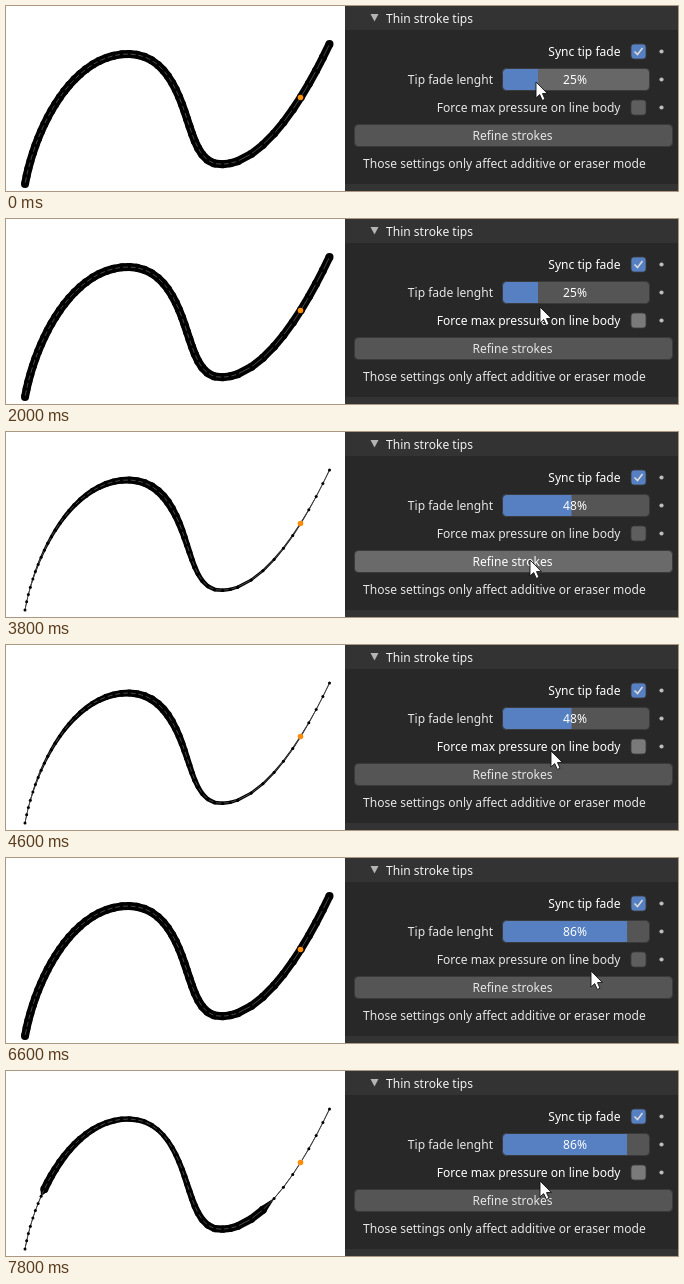
Animation of 672x185 px, one loop 8000 ms. Source, as an HTML page with a canvas:

```html
<!DOCTYPE html>
<html lang="en">
<head>
<meta charset="utf-8">
<title>Thin stroke tips</title>
<style>
  html, body { margin: 0; width: 100%; height: 100%; overflow: hidden; background: #fff; }
  canvas { display: block; }
</style>
</head>
<body>
<canvas id="stage" width="672" height="185"></canvas>
<script>
const ctx = document.getElementById('stage').getContext('2d');
const LOOP = 8000, STEP = 200, FULL = 4;
const BLUE = '#5680c2', TEXT = '#e6e6e6', WHITE = '#fff', EDGE = '#3a3a3a';

// Bezier chain: start, then two handles and an end for each piece
const CURVE = [
  [19, 178], [30, 118], [68, 48], [122, 48], [152, 48], [168, 72], [180, 110],
  [187, 130], [192, 152], [208, 157.5], [246, 165], [287, 115], [323.5, 38]
];

// Cursor tip and slider value: time, x, y, percent
const KEYS = [
  [0, 530, 76, 25], [400, 523, 122, 25], [1800, 523, 122, 25], [2000, 534, 88, 25],
  [2400, 537, 74, 25], [2800, 561, 74, 48], [3200, 541, 107, 48], [3800, 524, 128, 48],
  [4600, 545, 106, 48], [5600, 565, 74, 48], [6200, 605, 74, 86], [6600, 585, 113, 86],
  [7200, 528, 128, 86], [7800, 534, 110, 86]
];
// From pressing the button until undo
const REFINED = [[800, 2000], [3600, 4800], [7400, LOOP]];

function stateAt(t) {
  const next = KEYS.findIndex(k => k[0] > t);
  const a = KEYS[next < 0 ? KEYS.length - 1 : next - 1], b = next < 0 ? a : KEYS[next];
  const f = next < 0 ? 0 : (t - a[0]) / (b[0] - a[0]);
  const [, x, y, value] = a.map((v, i) => v + (b[i] - v) * f);
  return { x, y, value, drag: a[3] !== b[3] };
}

function bezier(i, f) {
  const g = 1 - f, weights = [g * g * g, 3 * g * g * f, 3 * g * f * f, f * f * f];
  return [0, 1].map(axis => weights.reduce((sum, w, k) => sum + w * CURVE[i + k][axis], 0));
}

// Stroke points lie close together at first and wide apart towards the end
function buildPoints() {
  const dense = [];
  let len = 0;
  for (let i = 0; i + 3 < CURVE.length; i += 3) {
    for (let k = 0; k <= 200; k++) {
      const p = bezier(i, k / 200), q = dense.length ? dense[dense.length - 1].p : p;
      len += Math.hypot(p[0] - q[0], p[1] - q[1]);
      dense.push({ p, len });
    }
  }
  const points = [];
  const spread = (from, to, gap) => {
    const n = Math.round((to - from) / gap);
    for (let i = 0; i < n; i++) {
      points.push(dense.find(s => s.len >= from + (to - from) * i / n).p);
    }
  };
  const turn = len - 152;
  spread(0, turn, 7.8);
  spread(turn, len, 15.2);
  points.push(CURVE[CURVE.length - 1]);
  return points;
}
const points = buildPoints();

function radius(i, fade) {
  if (!fade) return FULL;
  const last = points.length - 1, d = Math.min(i, last - i) / last;
  // Past half, the two fades overlap and the body thins towards the middle
  if (fade > 0.5) return d < 1 - fade ? 0.3 : FULL * (1 - d) / fade;
  return Math.max(0.3, FULL * Math.min(1, d / fade));
}

function disc(x, y, r, color) {
  ctx.fillStyle = color;
  ctx.beginPath();
  ctx.arc(x, y, r, 0, Math.PI * 2);
  ctx.fill();
}

function poly(pts, color) {
  ctx.fillStyle = color;
  ctx.beginPath();
  pts.forEach(p => ctx.lineTo(p[0], p[1]));
  ctx.closePath();
  ctx.fill();
}

function outline(color, width) {
  ctx.strokeStyle = color;
  ctx.lineWidth = width;
  ctx.stroke();
}

function box(x, y, w, h, r, color) {
  ctx.fillStyle = color;
  ctx.beginPath();
  ctx.roundRect(x, y, w, h, r);
  ctx.fill();
}

function text(str, x, y, align, color) {
  ctx.font = '12.05px "Noto Sans", "Open Sans", sans-serif';
  ctx.textAlign = align;
  ctx.fillStyle = color;
  ctx.fillText(str, x, y);
}

function drawStroke(fade) {
  points.forEach((p, i) => {
    const r = radius(i, fade), q = points[i + 1];
    disc(p[0], p[1], r, '#000');
    if (!q) return;
    const s = radius(i + 1, fade), a = Math.atan2(q[1] - p[1], q[0] - p[0]);
    const nx = -Math.sin(a), ny = Math.cos(a);
    poly([[p[0] + nx * r, p[1] + ny * r], [q[0] + nx * s, q[1] + ny * s],
          [q[0] - nx * s, q[1] - ny * s], [p[0] - nx * r, p[1] - ny * r]], '#000');
  });
  ctx.beginPath();
  points.forEach(p => ctx.lineTo(p[0], p[1]));
  outline('#484848', 1);
  points.forEach(p => disc(p[0], p[1], 1.5, '#000'));
  disc(294.5, 91.5, 2.8, '#ff8c0a');
}

function drawCheck(y, on, hover) {
  box(625, y - 7.5, 15, 15, 3, on ? BLUE : hover ? '#7a7a7a' : '#5e5e5e');
  outline(EDGE, 0.8);
  if (!on) return;
  ctx.beginPath();
  ctx.moveTo(628.5, y);
  ctx.lineTo(631.5, y + 3);
  ctx.lineTo(636.5, y - 3.5);
  outline('#dcdcdc', 1.5);
}

function drawSlider(value, hover, drag) {
  box(496.5, 62.5, 147, 22, 4, drag ? '#222' : hover ? '#676767' : '#555');
  ctx.save();
  ctx.clip();
  ctx.fillStyle = BLUE;
  ctx.fillRect(496, 62, 146 * value / 100 - 0.5, 23);
  ctx.restore();
  ctx.beginPath();
  ctx.roundRect(496.5, 62.5, 147, 22, 4);
  outline(EDGE, 1);
  text(Math.round(value) + '%', 569, 78, 'center', WHITE);
}

function drawPanel({ y, value, drag }) {
  const onSlider = drag || (y >= 63 && y < 86);
  const onForce = !drag && y >= 86 && y < 112;
  const onRefine = !drag && y >= 116;

  ctx.fillStyle = '#282828';
  ctx.fillRect(339, 0, 333, 185);
  ctx.fillStyle = '#333';
  ctx.fillRect(339, 0, 333, 24);
  ctx.fillRect(339, 178, 333, 7);
  poly([[364.5, 8], [372.5, 8], [368.5, 15.5]], '#b4b4b4');
  text('Thin stroke tips', 380, 17, 'left', '#f2f2f2');

  text('Sync tip fade', 614.5, 50, 'right', WHITE);
  drawCheck(45.5, true, false);
  text('Tip fade lenght', 487, 78, 'right', TEXT);
  drawSlider(value, onSlider, drag);
  text('Force max pressure on line body', 614.5, 106, 'right', onForce ? WHITE : TEXT);
  drawCheck(101.5, false, onForce);
  for (let i = 0; i < 3; i++) disc(655.5, 45.5 + 28 * i, 2.1, '#bcbcbc');

  box(348.5, 118.5, 318, 22, 4, onRefine ? '#6a6a6a' : '#555');
  outline(EDGE, 1);
  text('Refine strokes', 506.5, 134, 'center', onRefine ? WHITE : TEXT);
  text('Those settings only affect additive or eraser mode', 357, 162, 'left', TEXT);
}

function drawCursor(x, y) {
  const arrow = [[0, 0], [0, 16], [3.7, 12.6], [6.3, 18.4], [9, 17.2], [6.5, 11.6], [11.3, 11.4]];
  ctx.save();
  ctx.translate(x, y);
  poly(arrow, WHITE);
  outline('#111', 0.9);
  ctx.restore();
}

function draw(now) {
  const t = Math.floor((now % LOOP) / STEP) * STEP;
  const state = stateAt(t);
  const refined = REFINED.some(([from, to]) => t >= from && t < to);
  ctx.fillStyle = WHITE;
  ctx.fillRect(0, 0, 672, 185);
  drawStroke(refined ? state.value / 100 : 0);
  drawPanel(state);
  drawCursor(Math.round(state.x), Math.round(state.y));
}

let start;
function tick(now) {
  if (start === undefined) start = now;
  draw(now - start);
  requestAnimationFrame(tick);
}
draw(0);
requestAnimationFrame(tick);
</script>
</body>
</html>
```
